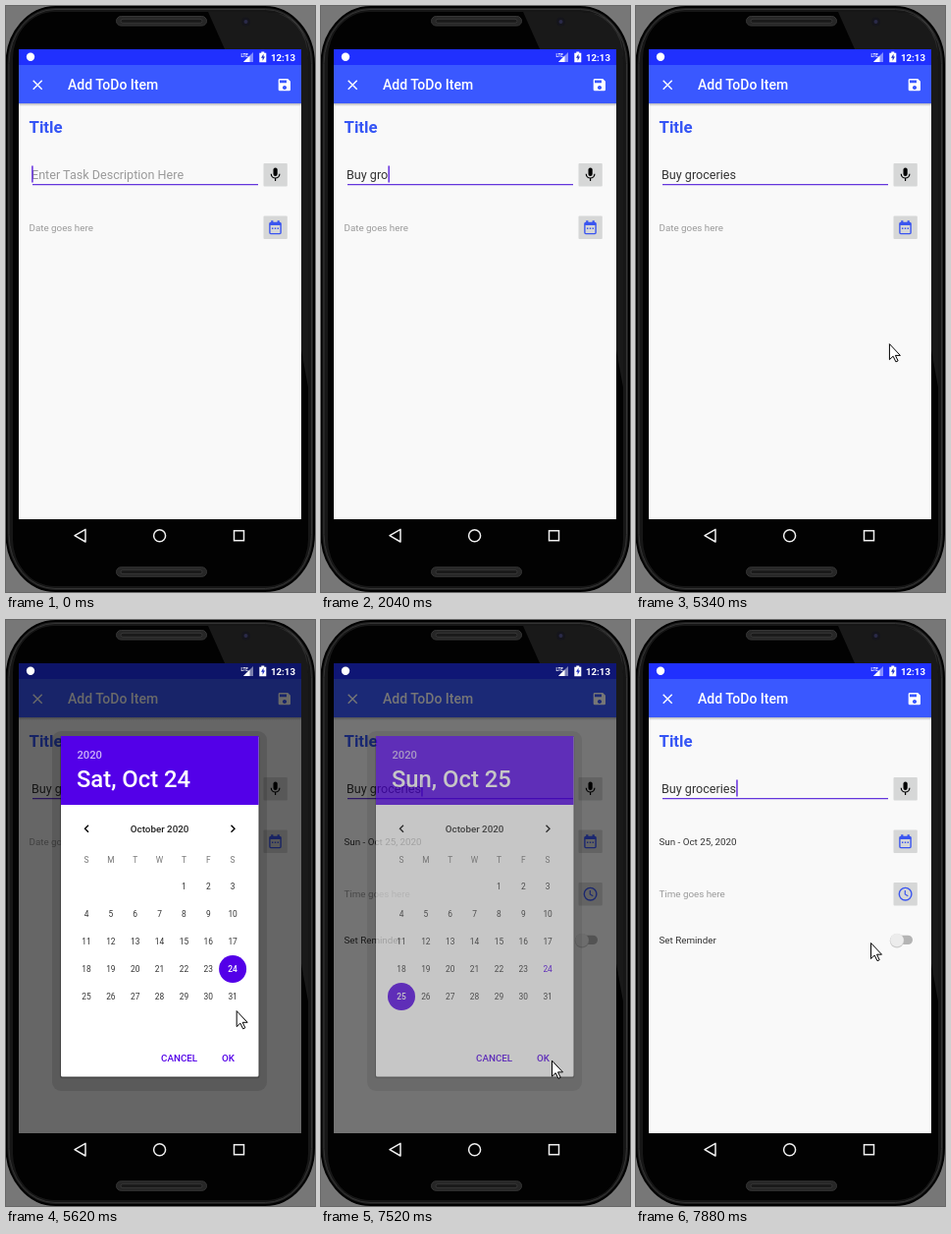
These frames come from a looping animation (315x596 px, 8000 ms). An HTML page:

```html
<!DOCTYPE html>
<html lang="en">
<head>
<meta charset="utf-8">
<title>Add ToDo Item</title>
<style>
  html, body { margin: 0; width: 100%; height: 100%; overflow: hidden; background: #777; }
  svg { display: block; width: 315px; height: 596px; font: 9.8px Roboto, sans-serif; }
  text { white-space: pre; }
  .m { font-weight: 500; }
  .mid { text-anchor: middle; }
  .hint { fill: #9a9a9a; }
  .line { fill: none; stroke: currentColor; }
</style>
</head>
<body>
<svg viewBox="0 0 315 596">
  <defs>
    <linearGradient id="shade" x2="0" y2="1">
      <stop stop-color="#b4b4bc"/><stop offset="1" stop-color="#f9f9f9"/>
    </linearGradient>
    <g id="speaker">
      <rect x="112.5" y="10.5" width="92" height="9.5" rx="4.7" fill="#262626" stroke="#363636"/>
      <rect x="117" y="13.3" width="83" height="4" rx="2" fill="#1a1a1a" stroke="#3c3c3c" stroke-width=".8"/>
    </g>
  </defs>

  <!-- phone body -->
  <rect x=".5" y="1" width="313.500" height="594" rx="50" ry="58" fill="#202020" stroke="#000" stroke-width="2"/>
  <rect x="3" y="3.500" width="308.500" height="589" rx="47" ry="55" fill="#161616" stroke="#333"/>
  <rect x="7" y="6" width="301" height="584" rx="42" ry="48" fill="#020202"/>
  <path d="M206 6H266Q308 8 308 54V388L301 350V44H223z" fill="#fff" opacity=".09"/>
  <use href="#speaker"/>
  <use href="#speaker" y="560.300"/>
  <circle cx="244.500" cy="16" r="4.500" fill="#15151c"/>
  <circle cx="244.500" cy="16" r="2" fill="#2a2a48"/>

  <!-- app screen -->
  <rect x="13" y="44" width="288" height="478" fill="#f9f9f9"/>
  <rect x="13" y="99" width="288" height="3" fill="url(#shade)"/>
  <rect x="13" y="44" width="288" height="16" fill="#2030fe"/>
  <rect x="13" y="60" width="288" height="39" fill="#3a58ff"/>
  <g color="#fff" fill="#fff">
    <path class="line" stroke-width="1.400" d="M27.700 75.700l9 9m0-9l-9 9"/>
    <text class="m" x="63" y="85.400" font-size="14">Add ToDo Item</text>
    <path fill-rule="evenodd" d="M279 74h8.300l2.700 2.700v8.300q0 1.300-1.300 1.300h-9.700q-1.300 0-1.300-1.300v-9.700q0-1.300 1.300-1.300zm0 1.400v2.800h7v-2.800zm5 5.500a2.100 2.100 0 1 0 .01 0z"/>
  </g>
  <text x="23.500" y="128.600" font-size="16.800" font-weight="700" fill="#3555f5">Title</text>
  <path stroke="#6436dc" stroke-width="1.400" d="M27 181.600H257"/>
  <text id="hint" class="hint" x="26" y="176" font-size="12.600">Enter Task Description Here</text>
  <text id="entry" x="26" y="176" font-size="12.600" fill="#333"></text>
  <rect id="caret" y="162.500" width="1.400" height="17" fill="#5a20dc"/>

  <g fill="#d6d7d7">
    <rect x="262.500" y="160" width="24.300" height="23.500" rx="1"/>
    <rect x="262.500" y="213.500" width="24.300" height="23.500" rx="1"/>
  </g>
  <rect x="272.500" y="164.500" width="4.200" height="8.500" rx="2.100"/>
  <path class="line" stroke-width="1.200" d="M270.300 170.700a4.300 4.300 0 0 0 8.600 0m-4.300 4.300v2.900"/>
  <g color="#3a55f0" class="line" stroke-width="1.400">
    <rect x="268.900" y="220.400" width="11.200" height="11.200" rx="1"/>
    <path d="M268.900 222H280.100M271.300 218.300v2M277.700 218.300v2" stroke-width="2.200"/>
    <path d="M271 226.200h7.400" stroke-dasharray="1.400"/>
  </g>
  <text id="date" y="229" x="23.500"></text>

  <g id="extra">
    <rect x="262.500" y="267" width="24.300" height="23.500" rx="1" fill="#d6d7d7"/>
    <g color="#3a55f0" class="line" stroke-width="1.400">
      <circle cx="274.600" cy="278.700" r="6.300"/>
      <path d="M274.300 275v4l3 1.800" stroke-width="1.200"/>
    </g>
    <text class="hint" x="23.500" y="282">Time goes here</text>
    <text x="23.500" y="329" fill="#333">Set Reminder</text>
    <rect x="262" y="320.700" width="20" height="9.400" rx="4.700" fill="#b4b4b4"/>
    <circle cx="266" cy="326.300" r="7.200" fill="#ccc"/>
    <circle cx="266" cy="325.500" r="6.800" fill="#ececec"/>
  </g>

  <rect id="scrim" x="13" y="44" width="288" height="478"/>

  <!-- status and navigation bars -->
  <g fill="#fff" color="#f0f0f0">
    <circle cx="25" cy="51.800" r="4.200"/>
    <text x="239.500" y="51.500" font-size="4.500" font-weight="700">LTE</text>
    <path d="M252 47v10h-10z" opacity=".45"/>
    <path d="M248.500 50.500v6.500h-6.500z"/>
    <path d="M260.300 46.500h3v1.200h2v9.500h-7v-9.500h2z"/>
    <path d="M262.500 48.800l-2.500 4h1.600v3l2.400-4.200h-1.500z" fill="#2030c0"/>
    <text x="270" y="55.700" font-size="9.700" font-weight="600">12:13</text>
    <g class="line" stroke-width="1.500">
      <path d="M70 538.700l11-6.300v12.600z" stroke-linejoin="round"/>
      <circle cx="156.600" cy="538.700" r="6"/>
      <rect x="232.500" y="533.700" width="10" height="10"/>
    </g>
  </g>

  <!-- date picker -->
  <g id="dialog">
    <rect x="47" y="113" width="219" height="366" rx="9" opacity=".12"/>
    <rect x="55" y="118" width="203.500" height="348" rx="2" opacity=".25"/>
    <rect x="56" y="118" width="201.500" height="346.500" rx="1.500" fill="#fff"/>
    <rect x="56" y="118" width="201.500" height="70" fill="#5300e8"/>
    <g class="m" fill="#fff">
      <text x="72.500" y="141" font-size="11.200" opacity=".7">2020</text>
      <text id="heading" x="72" y="169.500" font-size="23.800"></text>
    </g>
    <path class="line" stroke="#222" stroke-width="1.400" d="M84 208.800l-3.500 3.500 3.500 3.500M229.500 208.800l3.500 3.500-3.500 3.500"/>
    <text class="m mid" x="156.600" y="215.700" fill="#222">October 2020</text>
    <circle id="disc" r="14" fill="#5300e8"/>
    <g id="days" class="mid" font-size="8.400"></g>
    <g class="m" fill="#5300e8">
      <text x="158" y="448.500">CANCEL</text>
      <text x="220" y="448.500">OK</text>
    </g>
  </g>

  <path id="pointer" fill="#fff" stroke="#000" d="M.5.5v16l3.700-3.500 2.800 5.700 2.200-1-2.700-5.500h5z"/>
</svg>

<script>
const LOOP = 8000, BLINK = 510;
const FIRST_KEY = 1040, LAST_KEY = 3410;
const POINTER_IN = 4560, PICK = 6580, CONFIRM = 7520;
const phrase = 'Buy groceries';

// Key points [time, ...values], joined by straight lines.
const typing = [[0, 0], [FIRST_KEY, 1], [1340, 2], [2310, 9], [2770, 10], [LAST_KEY, 13]];
const fade = [[5360, 0], [5620, 1], [7400, 1], [7700, 0]];
const dim = [[5400, 0], [5620, .59], [7500, .59], [7740, 0]];
const travel = [
  [POINTER_IN, 283, 250], [5070, 274, 226], [5340, 258, 343], [5620, 235, 397],
  [5890, 143, 420], [6290, 80, 388], [PICK, 84, 389], [6740, 147, 421],
  [7250, 235, 448], [CONFIRM, 235, 448], [7880, 239, 328]
];

function follow(points, t) {
  const next = points.findIndex(point => point[0] > t);
  if (next < 1) return points.at(next).slice(1);
  const [from, to] = [points[next - 1], points[next]];
  const u = (t - from[0]) / (to[0] - from[0]);
  return from.slice(1).map((value, i) => value + u * (to[i + 1] - value));
}

const $ = id => document.getElementById(id);
const show = (id, on) => $(id).setAttribute('visibility', on ? 'visible' : 'hidden');
const set = (node, attributes) =>
  Object.entries(attributes).forEach(([name, value]) => node.setAttribute(name, value));

const column = i => 82 + 24.85 * (i % 7);
const row = i => 271 + 28 * Math.floor(i / 7);

function addLabel(text, x, y, fill) {
  const label = document.createElementNS('http://www.w3.org/2000/svg', 'text');
  label.textContent = text;
  set(label, { x, y, fill });
  $('days').append(label);
  return label;
}

[...'SMTWTFS'].forEach((name, i) => addLabel(name, column(i), 247, '#777'));
const days = Array.from({ length: 31 }, (_, i) =>
  addLabel(i + 1, column(i + 4), row(i + 4) + 3, '#333'));

function render(t) {
  const typed = Math.floor(follow(typing, t)[0]);
  $('entry').textContent = phrase.slice(0, typed);
  show('hint', !typed);

  // The caret stays lit while keys are pressed, then blinks.
  const idle = typed ? Math.max(0, t - LAST_KEY) : t + 140;
  show('caret', Math.floor(idle / BLINK) % 2 === 0);
  set($('caret'), { x: 26.2 + (typed && $('entry').getComputedTextLength()) });

  const dated = t >= CONFIRM;
  $('date').textContent = dated ? 'Sun - Oct 25, 2020' : 'Date goes here';
  set($('date'), { fill: dated ? '#333' : '#9a9a9a' });
  show('extra', dated);

  set($('dialog'), { opacity: follow(fade, t) });
  set($('scrim'), { opacity: follow(dim, t) });

  const picked = t >= PICK ? 25 : 24;
  $('heading').textContent = picked === 25 ? 'Sun, Oct 25' : 'Sat, Oct 24';
  set($('disc'), { cx: column(picked + 3), cy: row(picked + 3) });
  for (const day of [24, 25]) {
    const chosen = day === picked;
    set(days[day - 1], {
      fill: chosen ? '#fff' : day === 24 ? '#5300e8' : '#333',
      'font-weight': chosen ? 500 : 400
    });
  }

  show('pointer', t >= POINTER_IN);
  set($('pointer'), { transform: `translate(${follow(travel, t)})` });
}

const start = performance.now();
(function tick() {
  render((performance.now() - start) % LOOP);
  requestAnimationFrame(tick);
})();
</script>
</body>
</html>
```
